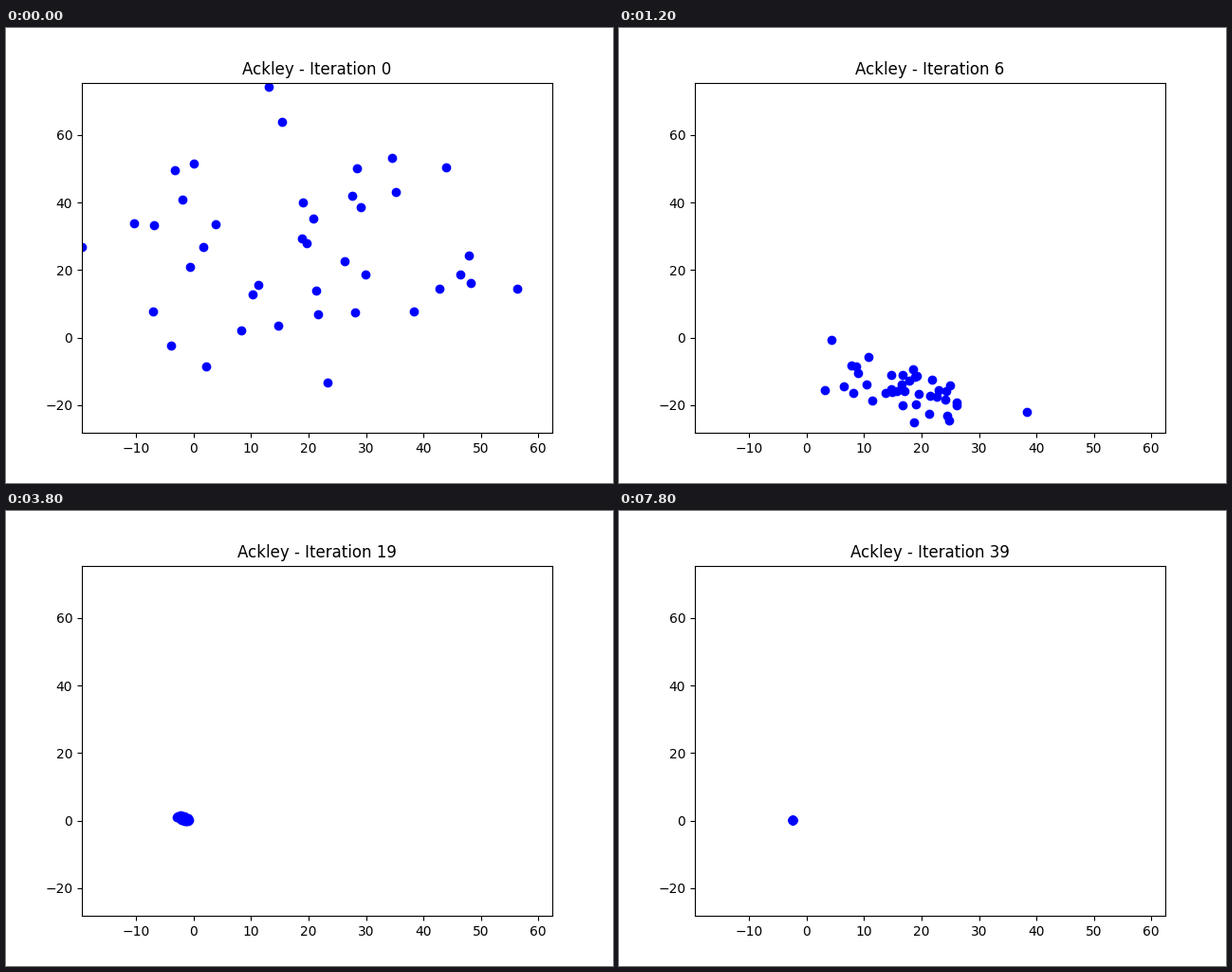
Animation, 640 px wide and 480 px high, one loop 8 s. Source, as a matplotlib script:

```python
import numpy as np
import matplotlib.pyplot as plt
from matplotlib.animation import FuncAnimation

STEPS = 40
SWARM = 40
XLIM = (-19.47, 62.44)
YLIM = (-28.24, 75.5)

# Generation, mean x, mean y, spread x, spread y
KEYS = np.array([
    (0, 18.3, 26.2, 18.5, 19.5),
    (2, 38.3, 9.9, 9.8, 13.0),
    (4, 32.0, -7.0, 8.3, 8.0),
    (6, 17.3, -15.3, 7.0, 5.0),
    (10, 1.6, -3.0, 3.2, 2.4),
    (12, -0.6, -0.6, 2.0, 1.5),
    (19, -1.7, 0.6, 0.5, 0.4),
    (27, -2.25, 0.1, 0.07, 0.04),
    (39, -2.4, 0.1, 0.005, 0.005),
])


def along(k, column):
    return np.interp(k, KEYS[:, 0], column)


def standard_cloud(k):
    """Normal sample with exactly zero mean and unit spread on each axis."""
    z = np.random.default_rng(100 + k).normal(size=(SWARM, 2))
    rho = -0.4 if k > 3 else 0.0  # later swarms lean down to the right
    z[:, 1] = rho * z[:, 0] + np.sqrt(1 - rho ** 2) * z[:, 1]
    return (z - z.mean(axis=0)) / z.std(axis=0)


def population(k):
    mean = [along(k, KEYS[:, i]) for i in (1, 2)]
    spread = [np.exp(along(k, np.log(KEYS[:, i]))) for i in (3, 4)]
    points = mean + spread * standard_cloud(k)
    low, high = zip(XLIM, YLIM)
    return np.clip(points, low, high)


fig, ax = plt.subplots(figsize=(6.4, 4.8), dpi=100)
dots = ax.scatter([], [], color="blue")
ax.set_xlim(*XLIM)
ax.set_ylim(*YLIM)
title = ax.set_title("Ackley - Iteration 0")


def update(k):
    dots.set_offsets(population(k))
    title.set_text(f"Ackley - Iteration {k}")
    return dots, title


anim = FuncAnimation(fig, update, frames=STEPS, interval=200,
                     repeat=True, repeat_delay=0)
plt.show()
```
